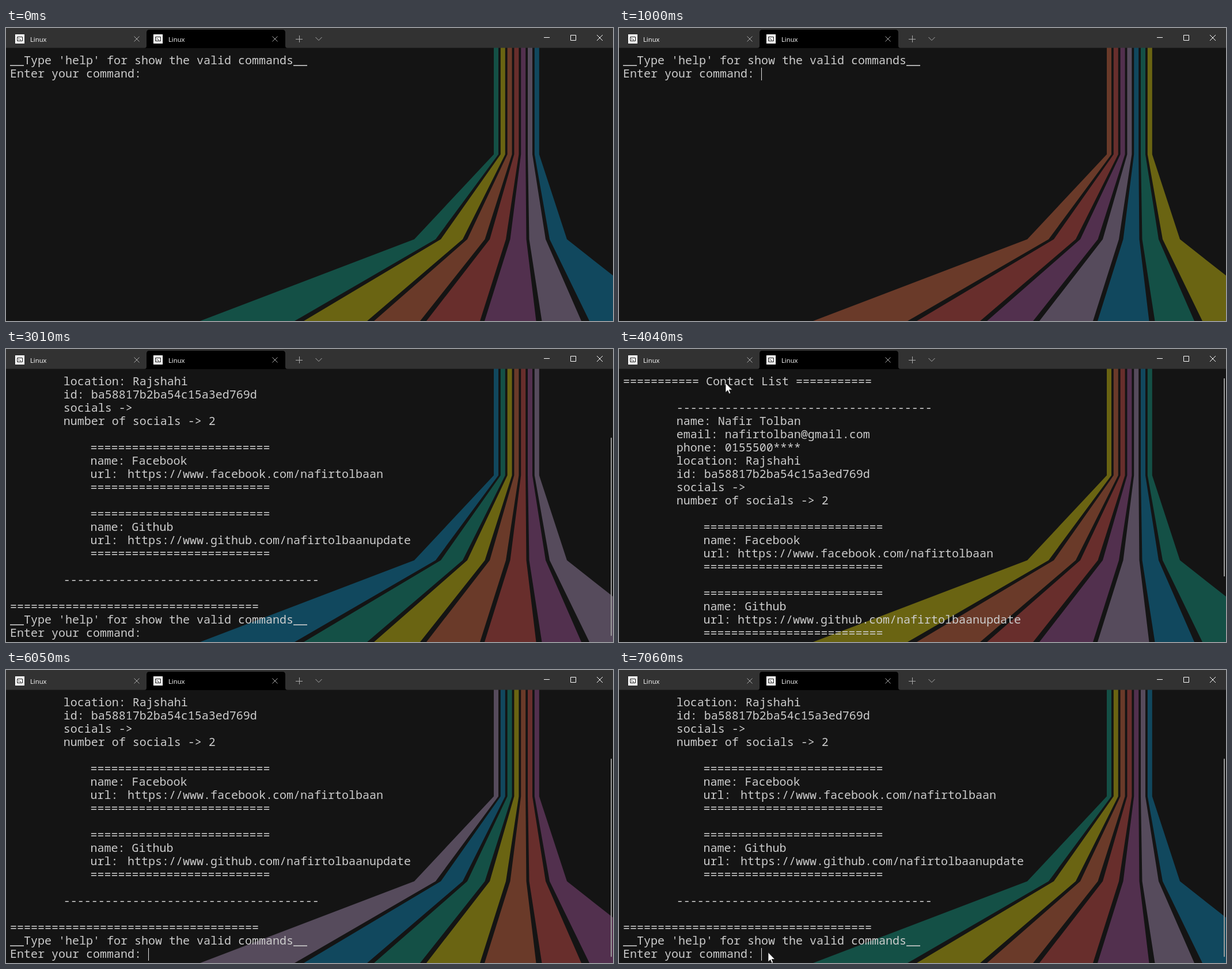
An HTML page for the animation above (8000 ms loop, 1054 by 509 pixels).

```html
<!DOCTYPE html>
<html lang="en">
<head>
<meta charset="utf-8">
<title>Terminal</title>
<style>
html, body { margin: 0; width: 100%; height: 100%; overflow: hidden; background: #141414; }
svg { display: block; width: 1054px; height: 509px; }
.term { font: 500 20px "Noto Sans Mono", "DejaVu Sans Mono", monospace; fill: #ccc; white-space: pre; font-variant-ligatures: none; }
.tab { font: 11.3px "Open Sans", "Noto Sans", sans-serif; fill: #fff; }
.line { fill: none; stroke-width: 1; }
</style>
</head>
<body>
<svg viewBox="0 0 1054 509">
  <rect width="1054" height="509" fill="#141414"/>
  <g id="bands"></g>
  <g id="text" class="term"></g>
  <rect id="thumb" x="1050" width="2" height="344" fill="#9a9a9a"/>
  <rect id="caret" width="1" height="22" fill="#e0e0e0"/>

  <rect width="1054" height="34.5" fill="#323232"/>
  <path d="M240 35Q244 35 244 31V8Q244 3 249 3H480Q485 3 485 8V31Q485 35 489 35Z" fill="#000"/>
  <g id="tabs"></g>
  <path class="line" stroke="#aaa" d="M503 19.5H515M509.500 13V25M537.500 16L543 21.500L548.500 16"/>
  <path class="line" stroke="#fff" d="M934 16.500H944M980.500 12.500H989.500V21.500H980.500ZM1026 12L1036 22M1036 12L1026 22"/>

  <path id="mouse" d="M0 0V16.500L3.800 12.900L6.300 18.700L8.700 17.600L6.300 12H11.700Z" fill="#fff" stroke="#111" stroke-width=".8"/>
</svg>
<script>
const LOOP = 8000, ROW = 23, BASE = 63, MARGIN = 7;
const COLORS = ['#145046', '#6a6412', '#6a3a29', '#682e2c', '#52304e', '#564b5c', '#11485e'];
// left and right edge of each band at the knee and at the bottom
const KNEE = [[709, 746], [755, 793], [801, 831.5], [840, 868], [875.5, 903.5], [908.5, 937], [944, 974]];
const FOOT = [[337, 501], [517, 627], [639, 719], [730, 823], [831, 920.5], [930.5, 999], [1013, 1154]];

const steps = [
  { at: 0, page: 'prompt' },
  { at: 1000, page: 'prompt', caret: [247, 1] },
  { at: 1990, page: 'prompt', typed: ' show', caret: [295, 1] },
  { at: 3010, page: 'list', scroll: 6, shift: 5 },
  { at: 4040, page: 'list', scroll: 0, mouse: [185, 59] },
  { at: 5040, page: 'list', scroll: 6, caret: [247, 19], mouse: [167.5, 189] },
  { at: 6050, page: 'list', scroll: 6, shift: 5, caret: [247, 19] },
  { at: 7060, page: 'list', scroll: 6, shift: 5, caret: [247, 19], mouse: [259, 490.5] }
];

const INDENT = [MARGIN, 99.7, 146.4];
const rule = (ch, n) => ch.repeat(n);
const social = (name, url) => [
  [2, rule('=', 26)], [2, 'name: ' + name], [2, 'url:', url], [2, rule('=', 26)], []
];
const prompt = [[0, "__Type 'help' for show the valid commands__"], [0, 'Enter your command:']];
const pages = {
  prompt,
  list: [
    [0, `${rule('=', 11)} Contact List ${rule('=', 11)}`], [],
    [1, rule('-', 37)],
    [1, 'name: Nafir Tolban'],
    [1, 'email: nafirtolban@gmail.com'],
    [1, 'phone: 0155500****'],
    [1, 'location: Rajshahi'],
    [1, 'id: ba58817b2ba54c15a3ed769d'],
    [1, 'socials ->'],
    [1, 'number of socials -> 2'], [],
    ...social('Facebook', 'https://www.facebook.com/nafirtolbaan'),
    ...social('Github', 'https://www.github.com/nafirtolbaanupdate'),
    [1, rule('-', 37)], [],
    [0, rule('=', 36)],
    ...prompt
  ]
};

const $ = id => document.getElementById(id);
function add(parent, tag, attrs, text) {
  const el = document.createElementNS('http://www.w3.org/2000/svg', tag);
  for (const key in attrs) el.setAttribute(key, attrs[key]);
  if (text) el.textContent = text;
  return parent.appendChild(el);
}

const bands = KNEE.map(([kl, kr], i) => {
  const x = 847 + 11.8 * i, [fl, fr] = FOOT[i];
  return add($('bands'), 'path', {
    d: `M${x} 34H${x + 8}V219.500L${kr} 367L${fr} 509H${fl}L${kl} 367L${x} 219.500Z`
  });
});

for (const x of [0, 240]) {
  const g = add($('tabs'), 'g', { transform: `translate(${x})` });
  add(g, 'rect', { x: 16, y: 11, width: 16, height: 16, fill: '#fff' });
  add(g, 'path', { class: 'line', stroke: '#111', d: 'M19.500 15.500H28.500V22.500H19.500ZM21.500 17.500L23 19L21.500 20.500M24 20.500H26' });
  add(g, 'text', { class: 'tab', x: 42, y: 24 }, 'Linux');
  add(g, 'path', { class: 'line', stroke: '#aaa', d: 'M222.500 14.500L231.500 23.500M231.500 14.500L222.500 23.500' });
}

function drawText({ page, scroll = 0, shift = 0, typed = '' }) {
  const box = $('text');
  box.replaceChildren();
  pages[page].slice(scroll, scroll + 20).forEach(([indent, label, url], row) => {
    if (!label) return;
    const y = BASE + row * ROW;
    add(box, 'text', { x: INDENT[indent], y }, label.startsWith('Enter') ? label + typed : label);
    if (url) add(box, 'text', { x: 206 + shift, y }, url);
  });
}

function show(el, on) {
  el.setAttribute('visibility', on ? 'visible' : 'hidden');
}

function draw(index) {
  const step = steps[index], { caret, mouse, scroll } = step;
  bands.forEach((band, i) => band.setAttribute('fill', COLORS[(i + 2 * index) % 7]));
  drawText(step);
  show($('thumb'), step.page === 'list');
  if (step.page === 'list') $('thumb').setAttribute('y', 51 + scroll * 17.2);
  show($('caret'), caret);
  if (caret) {
    $('caret').setAttribute('x', caret[0]);
    $('caret').setAttribute('y', 46 + caret[1] * ROW);
  }
  show($('mouse'), mouse);
  if (mouse) $('mouse').setAttribute('transform', `translate(${mouse})`);
}

let current = -1;
function tick() {
  const t = performance.now() % LOOP;
  const index = steps.findLastIndex(step => t >= step.at);
  if (index !== current) draw(current = index);
  requestAnimationFrame(tick);
}
tick();
</script>
</body>
</html>
```
